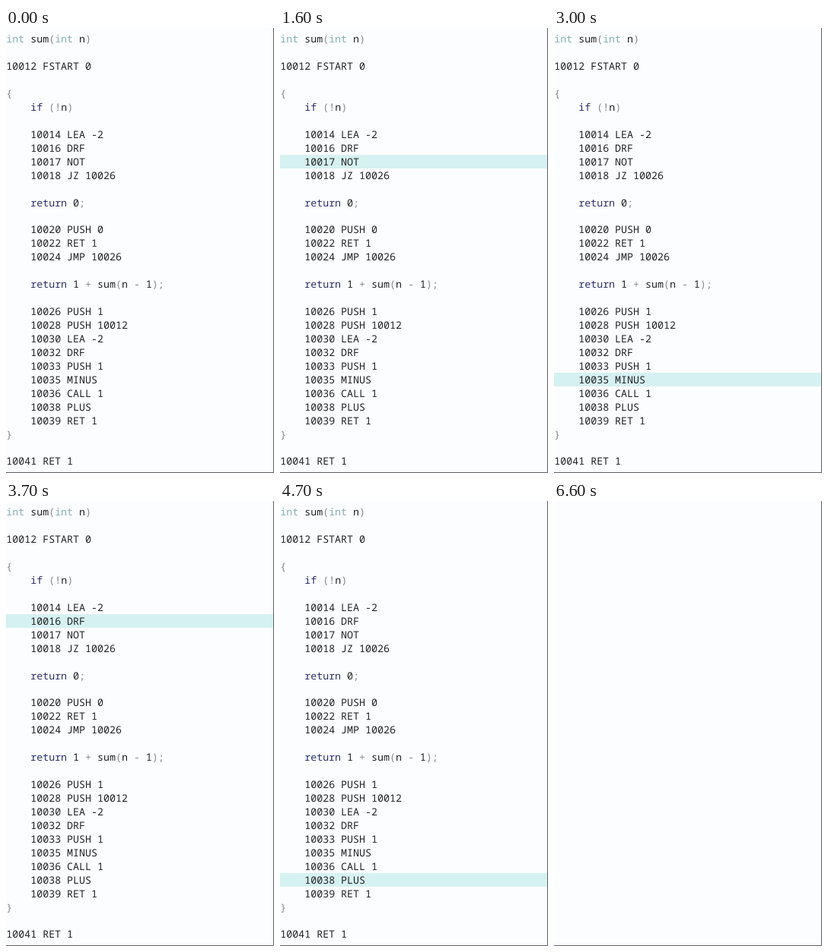
An HTML page for the animation above (7 s loop, 352x586 px).

```html
<!DOCTYPE html>
<html lang="en">
<head>
<meta charset="utf-8">
<title>Recursive sum</title>
<style>
  html, body { margin: 0; width: 100%; height: 100%; overflow: hidden; background: #fcfdfe; }
  svg { display: block; width: 100%; height: 100%; }
  text {
    font: 13.3px "Noto Sans Mono", "DejaVu Sans Mono", monospace;
    white-space: pre;
    text-rendering: geometricPrecision;
    fill: #232326;
  }
  .type { fill: #82b0b3; }
  .word { fill: #2c2f6c; }
  .mark { fill: #88888c; }
</style>
</head>
<body>
<svg viewBox="0 0 352 586" preserveAspectRatio="none">
  <rect width="352" height="586" fill="#fcfdfe"/>
  <rect id="bar" width="351" height="18" fill="#d6f1f1"/>
  <g id="code"></g>
  <path d="M351.5 0V585.5H0" fill="none" stroke="#5c5f65"/>
</svg>
<script>
const LOOP = 7000, START = 900, STEP = 200, CLEAR = 6600;
const LINE = 17.94, CHAR = 7.98, LEFT = 0.3, BASE = 19.3, BAR_TOP = 5.5;

const source = `int sum(int n)

10012 FSTART 0

{
    if (!n)

    10014 LEA -2
    10016 DRF
    10017 NOT
    10018 JZ 10026

    return 0;

    10020 PUSH 0
    10022 RET 1
    10024 JMP 10026

    return 1 + sum(n - 1);

    10026 PUSH 1
    10028 PUSH 10012
    10030 LEA -2
    10032 DRF
    10033 PUSH 1
    10035 MINUS
    10036 CALL 1
    10038 PLUS
    10039 RET 1
}

10041 RET 1`;

const lines = source.split("\n");
const rowOf = {};
const code = document.getElementById("code");
const bar = document.getElementById("bar");

function paint(text) {
  return text
    .replace(/\b(int|if|return)\b|[(){};!+-]+/g, (token, word) => {
      const kind = !word ? "mark" : word === "int" ? "type" : "word";
      return `<tspan class="${kind}">${token}</tspan>`;
    });
}

code.innerHTML = lines.map((line, row) => {
  const text = line.trim();
  if (!text) return "";
  const address = text.match(/^\d{5}/);
  if (address) rowOf[address[0]] = row;
  const x = LEFT + (line.length - text.length) * CHAR;
  return `<text x="${x}" y="${BASE + row * LINE}">${address ? text : paint(text)}</text>`;
}).join("");

// Program counter for sum(1): one recursive call, then the unwinding.
const enter = [10012, 10014, 10016, 10017, 10018];
const recurse = [10026, 10028, 10030, 10032, 10033, 10035, 10036];
const finish = [10020, 10022, 10038, 10039];
const trace = [...enter, ...recurse, ...enter, ...finish];

function render(t) {
  const row = rowOf[trace[Math.floor((t - START) / STEP)]];
  const active = row !== undefined;
  bar.setAttribute("visibility", active ? "visible" : "hidden");
  if (active) bar.setAttribute("y", BAR_TOP + row * LINE);
  code.setAttribute("visibility", t < CLEAR ? "visible" : "hidden");
}

const begin = performance.now();
function tick() {
  render((performance.now() - begin) % LOOP);
  requestAnimationFrame(tick);
}
tick();
</script>
</body>
</html>
```
